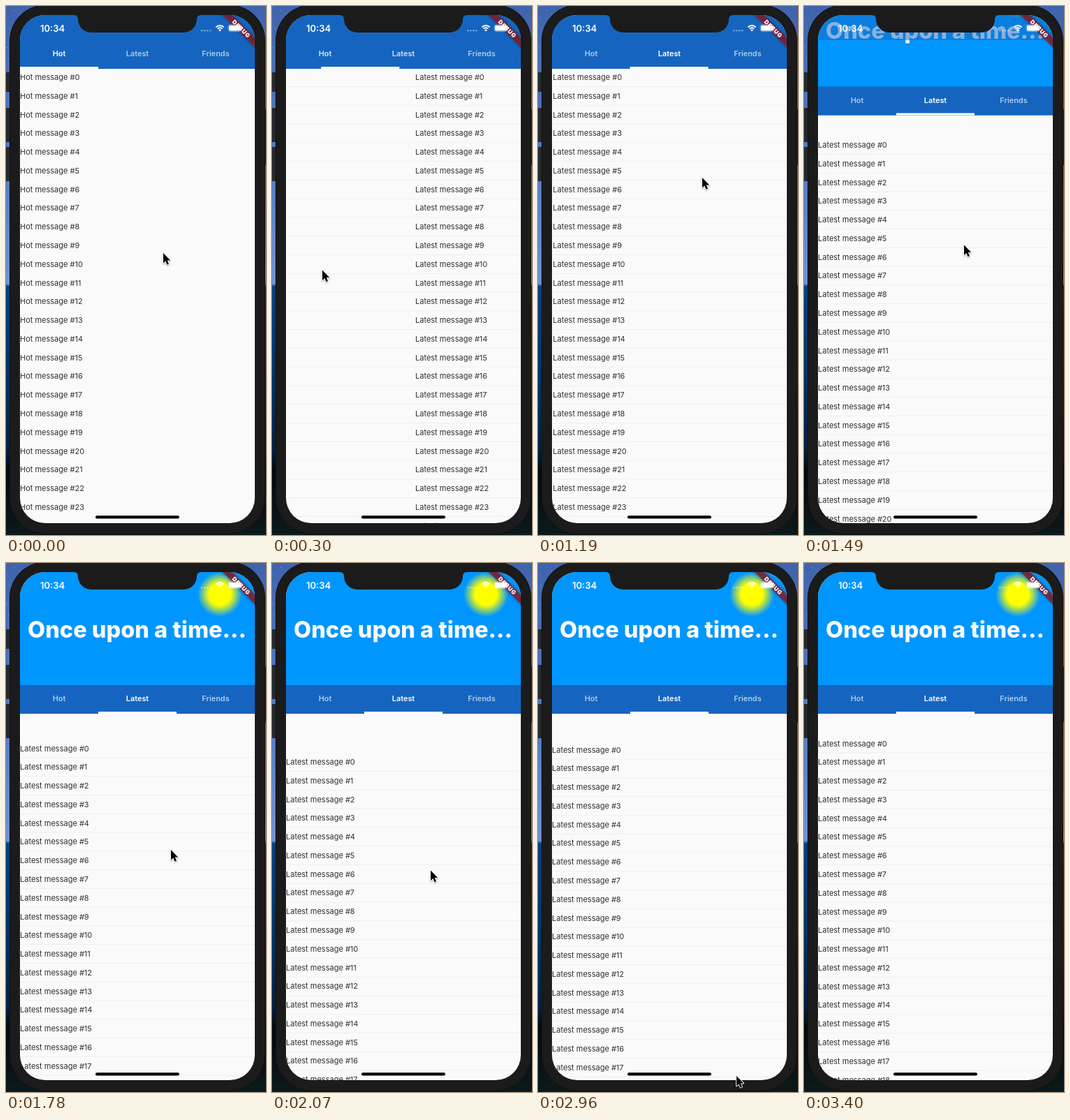
An HTML page with a canvas for the animation above (3.7 s loop, 372 by 758 pixels).

```html
<!DOCTYPE html>
<html lang="en">
<head>
<meta charset="utf-8">
<title>Collapsing header with tabs</title>
<style>
  html, body { margin: 0; width: 100%; height: 100%; overflow: hidden; background: #1b1b1c; }
  canvas { display: block; width: 372px; height: 758px; }
</style>
</head>
<body>
<canvas id="stage"></canvas>
<script>
const W = 372, H = 758, LOOP = 3700, STEP = 147.8, LAST = 23;
const SCREEN = { x: 20, y: 13, w: 336, h: 728 };
const BAR = '#1565c0', SKY = '#0096ff', PAPER = '#fafafa', BEZEL = '#1b1b1c';
const ROW = 26.78, TAB_W = SCREEN.w / 3, TAB_H = 41, GROWTH = 126, LIST_GAP = 30.5;
const TABS = ['Hot', 'Latest', 'Friends'];

// Keyframes: step, then values
const SWIPE = [[0, 0], [1, 34], [2, 151], [3, 151], [4, 194]];
const PULL = [[8, 0], [9, 45], [10, 97], [11, 134], [12, 163.5], [13, 174.5], [14, 183],
  [15, 191.5], [16, 194], [18, 194], [19, 185.5], [20, 165.5], [21, 158.5], [23, 156.5]];
const POINTER = [[0, 225, 354], [1, 189, 358], [2, 72, 378.5], [3, 107, 362], [4, 165, 300],
  [5, 247, 235], [6, 234, 200], [8, 235, 246], [10, 229, 342.5], [11, 233, 380],
  [12, 236, 411], [13, 226, 427], [14, 227, 440.5], [15, 228, 450], [17, 228, 450],
  [18, 229, 484.5], [19, 259, 610], [20, 284, 735]];

const canvas = document.getElementById('stage');
const ratio = window.devicePixelRatio || 1;
canvas.width = W * ratio;
canvas.height = H * ratio;
const c = canvas.getContext('2d');

const clamp = (v, lo, hi) => Math.min(hi, Math.max(lo, v));

function sample(track, n) {
  const next = track.findIndex(k => k[0] >= n);
  if (next < 0) return track[track.length - 1].slice(1);
  if (next === 0) return track[0].slice(1);
  const a = track[next - 1], b = track[next];
  const u = (n - a[0]) / (b[0] - a[0]);
  return a.slice(1).map((v, i) => v + (b[i + 1] - v) * u);
}

function pageOffset(n) {
  if (n <= 4) return sample(SWIPE, n)[0];
  const rest = 142 * Math.exp(-1.177 * (n - 4));
  return SCREEN.w - (rest < 0.5 ? 0 : rest);
}

function rect(x, y, w, h, fill) {
  c.fillStyle = fill;
  c.fillRect(x, y, w, h);
}

function pill(x, y, w, h, r, fill) {
  c.beginPath();
  c.roundRect(x, y, w, h, r);
  c.fillStyle = fill;
  c.fill();
}

function label(str, x, y, font, fill, align = 'left') {
  c.font = font + ' Inter, sans-serif';
  c.textAlign = align;
  c.textBaseline = 'alphabetic';
  c.fillStyle = fill;
  c.fillText(str, x, y);
}

function gradient(g, stops) {
  for (const [pos, color] of stops) g.addColorStop(pos, color);
  return g;
}

function drawDesktop() {
  const night = gradient(c.createLinearGradient(0, 0, 0, H), [
    [0, '#3f64ad'], [0.15, '#4a70b8'], [0.35, '#587fc6'], [0.525, '#7193d4'],
    [0.53, '#07417f'], [0.68, '#043468'], [0.84, '#03203f'], [0.88, '#04080d'], [1, '#0b1a1c']]);
  rect(0, 0, W, H, night);
  for (let i = 0; i < 16; i++) {
    rect((i * 37) % 24, (i * 53) % 90, 1, 1, 'rgba(210,225,255,.5)');
  }
  for (const [y, h] of [[95, 28], [146, 49], [202, 49]]) pill(-4, y, 12, h, 2, '#25282e');
  rect(370, 148, 2, 80, '#25282e');
  pill(5, -2, 366, 759, 52, '#111112');
  pill(6, -1, 364, 757, 51, BEZEL);
}

function drawNotch() {
  c.beginPath();
  c.moveTo(97, 12);
  c.lineTo(97, 13);
  c.quadraticCurveTo(103, 13, 103, 19);
  c.arcTo(103, 38, 123, 38, 19);
  c.arcTo(273, 38, 273, 19, 19);
  c.lineTo(273, 19);
  c.quadraticCurveTo(273, 13, 279, 13);
  c.lineTo(279, 12);
  c.fillStyle = BEZEL;
  c.fill();
}

function drawList(name, x, shift, lines) {
  for (let i = 0; i < 26; i++) {
    const y = 102 + shift + i * ROW;
    if (y > 760) break;
    label(`${name} message #${i}`, x, y + 4, '400 11px', '#303030');
    if (lines) rect(x, y + 13, SCREEN.w, 1, '#efefef');
  }
}

function drawHeader(bottom, grown) {
  const dy = grown - GROWTH;
  rect(20, 13, SCREEN.w, bottom - 13, SKY);
  const sun = gradient(c.createRadialGradient(306, 45 + dy, 0, 306, 45 + dy, 32), [
    [0, '#ffff00'], [0.48, '#ffff00'], [0.62, 'rgba(255,255,0,.75)'], [1, 'rgba(255,255,0,0)']]);
  rect(270, 9 + dy, 72, 72, sun);
  label('Once upon a time...', 187.5, 106.7 + dy, '800 32.5px', PAPER, 'center');

  // The status strip clears as the header opens
  c.globalAlpha = clamp(1 - (grown - 24) / 84, 0, 1);
  rect(20, 13, SCREEN.w, 36, BAR);
  c.globalAlpha = 1;
}

function drawTabs(bottom, page) {
  rect(20, bottom - TAB_H, SCREEN.w, TAB_H, BAR);
  TABS.forEach((name, i) => {
    const near = clamp(1 - Math.abs(page - i), 0, 1);
    const alpha = 0.66 + 0.34 * near;
    label(name, 20 + TAB_W * (i + 0.5), bottom - 18, '600 10.9px', `rgba(255,255,255,${alpha})`, 'center');
  });
  rect(20 + TAB_W * page, bottom - 3, TAB_W, 3, '#fff');
}

function drawRibbon() {
  c.save();
  c.translate(356, 13);
  c.rotate(Math.PI / 4);
  c.shadowColor = 'rgba(0,0,0,.5)';
  c.shadowBlur = 4 * ratio;
  rect(-40, 22.75, 80, 9.75, 'rgba(140,28,40,.78)');
  c.shadowColor = 'transparent';
  c.letterSpacing = '0.8px';
  label('DEBUG', 0.4, 30.7, '900 8.3px', '#fff', 'center');
  c.restore();
}

function drawStatus() {
  label('10:34', 49, 36.7, '600 13px', '#fff');
  for (let i = 0; i < 4; i++) pill(279 + i * 4, 34, 2.6, 2.6, 1.3, 'rgba(255,255,255,.4)');
  c.strokeStyle = '#fff';
  c.lineWidth = 1.9;
  for (const r of [4.8, 8]) {
    c.beginPath();
    c.arc(306, 36, r, -Math.PI * 0.75, -Math.PI * 0.25);
    c.stroke();
  }
  c.beginPath();
  c.moveTo(306, 36.4);
  c.arc(306, 36.4, 2.8, -Math.PI * 0.75, -Math.PI * 0.25);
  c.fillStyle = '#fff';
  c.fill();
  c.beginPath();
  c.roundRect(318, 26.8, 19, 9.6, 2.8);
  c.strokeStyle = 'rgba(255,255,255,.5)';
  c.lineWidth = 0.8;
  c.stroke();
  pill(319, 27.8, 17, 7.6, 2, '#fff');
  pill(338, 30, 1.3, 3.2, 0.6, 'rgba(255,255,255,.5)');
}

function drawPointer([x, y]) {
  c.save();
  c.translate(x, y);
  c.beginPath();
  c.moveTo(0, 0);
  for (const [px, py] of [[0, 14.5], [3.3, 11.5], [5.6, 16.8], [8, 15.7], [5.8, 10.5], [10.2, 10.5]]) {
    c.lineTo(px, py);
  }
  c.closePath();
  c.shadowColor = 'rgba(0,0,0,.35)';
  c.shadowBlur = 2 * ratio;
  c.shadowOffsetY = ratio;
  c.strokeStyle = '#fff';
  c.lineWidth = 1.8;
  c.lineJoin = 'round';
  c.stroke();
  c.shadowColor = 'transparent';
  c.fillStyle = '#000';
  c.fill();
  c.restore();
}

function draw(n) {
  const offset = pageOffset(n);
  const shift = sample(PULL, n)[0];
  const grown = clamp(shift - LIST_GAP, 0, GROWTH);
  const bottom = 90 + grown;

  c.setTransform(ratio, 0, 0, ratio, 0, 0);
  drawDesktop();

  c.save();
  c.beginPath();
  c.roundRect(SCREEN.x, SCREEN.y, SCREEN.w, SCREEN.h, 36);
  c.clip();
  rect(SCREEN.x, SCREEN.y, SCREEN.w, SCREEN.h, PAPER);
  if (offset < SCREEN.w) drawList('Hot', 20 - offset, shift, n > 0);
  if (offset > 0) drawList('Latest', 20 + SCREEN.w - offset, shift, true);
  drawHeader(bottom, grown);
  drawTabs(bottom, offset / SCREEN.w);
  drawRibbon();
  drawStatus();
  pill(128, 730.3, 120, 4.2, 2.1, '#000');
  c.restore();

  drawNotch();
  if (n <= 20) drawPointer(sample(POINTER, n));
}

const start = performance.now();
function tick() {
  const t = (performance.now() - start) % LOOP;
  draw(Math.min(LAST, Math.floor(t / STEP)));
  requestAnimationFrame(tick);
}
tick();
</script>
</body>
</html>
```
